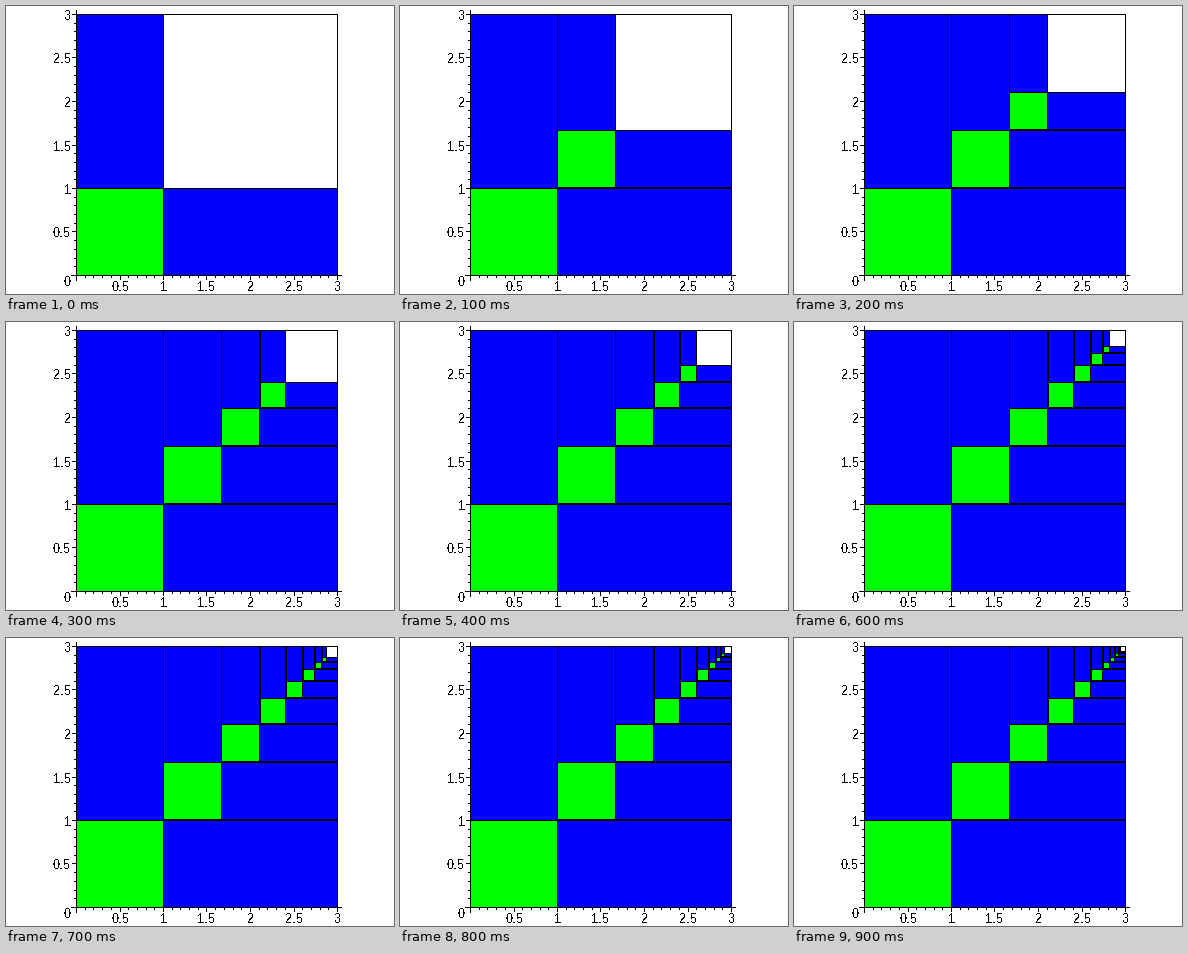
A matplotlib script that plays this animation: 388 px wide and 288 px high, repeating every 1000 ms.

```python
import math

import matplotlib.pyplot as plt
from matplotlib.animation import FuncAnimation
from matplotlib.patches import Rectangle

plt.rcParams.update({
    "toolbar": "None",
    "font.family": "Liberation Sans",
    "text.antialiased": False,
    "text.hinting": "default",
    "text.hinting_factor": 1,
})

WIDTH, HEIGHT, DPI = 388, 288, 100
STEPS, INTERVAL = 10, 100
UNIT, SIDE = 87, 261
LEFT, BOTTOM = 70, 269
RIGHT, TOP = LEFT + SIDE, BOTTOM - SIDE
BLUE, GREEN, BLACK = "#0000ff", "#00ff00", "#000000"

fig = plt.figure(figsize=(WIDTH / DPI, HEIGHT / DPI), dpi=DPI, facecolor="white")
ax = fig.add_axes([0, 0, 1, 1])
ax.set_xlim(0, WIDTH)
ax.set_ylim(HEIGHT, 0)
ax.axis("off")


def fill(x0, y0, x1, y1, color=BLACK, z=3):
    """Fill a block of whole pixels, both corners included."""
    block = Rectangle((x0, y0), x1 - x0 + 1, y1 - y0 + 1,
                      facecolor=color, linewidth=0, antialiased=False, zorder=z)
    return ax.add_patch(block)


def outlined(x0, y0, x1, y1, color, z):
    parts = [fill(x0, y0, x1, y1, BLACK, z)]
    if x1 - x0 > 1 and y1 - y0 > 1:
        parts.append(fill(x0 + 1, y0 + 1, x1 - 1, y1 - 1, color, z))
    return parts


def covered(step):
    """Diagonal length in pixels covered after a number of steps."""
    return round(SIDE * (1 - (2 / 3) ** step), 6)


def make_step(k):
    start, end = covered(k), covered(k + 1)
    x0, x1 = LEFT + math.ceil(start), LEFT + math.floor(end)
    y0 = BOTTOM - math.floor(start) - (k > 0)
    y1 = BOTTOM - math.floor(end)
    z = 1 + k / 100
    return (outlined(x0, TOP, x1, y1, BLUE, z)
            + outlined(x1, y1, RIGHT, y0, BLUE, z)
            + outlined(x0, y1, x1, y0, GREEN, z))


def draw_axes():
    fill(LEFT, TOP, RIGHT, TOP)
    fill(RIGHT, TOP, RIGHT, BOTTOM)
    fill(LEFT, TOP - 4, LEFT, BOTTOM + 5)
    fill(LEFT - 5, BOTTOM, RIGHT + 4, BOTTOM)
    for tenth in range(1, 31):
        offset = round(tenth * UNIT / 10)
        x, y = LEFT + offset, BOTTOM - offset
        major = tenth % 5 == 0
        length = 4 if major else 2
        fill(x, BOTTOM, x, BOTTOM + length)
        fill(LEFT - length, y, LEFT, y)
        if major:
            label = f"{tenth / 10:g}"
            write(x + 0.5, BOTTOM + 16, label, "center")
            write(LEFT - 5, y + 6, label, "right")
    write(LEFT - 5, BOTTOM + 11, "0", "right")


def write(x, baseline, label, align):
    ax.text(x, baseline, label, ha=align, va="baseline",
            fontsize=13 * 72 / DPI, color=BLACK, zorder=4)


draw_axes()
steps = [make_step(k) for k in range(STEPS)]


def update(frame):
    for k, parts in enumerate(steps):
        for part in parts:
            part.set_visible(k <= frame)
    return [part for parts in steps for part in parts]


anim = FuncAnimation(fig, update, frames=STEPS, interval=INTERVAL,
                     repeat=True, repeat_delay=0, blit=False)
plt.show()
```
